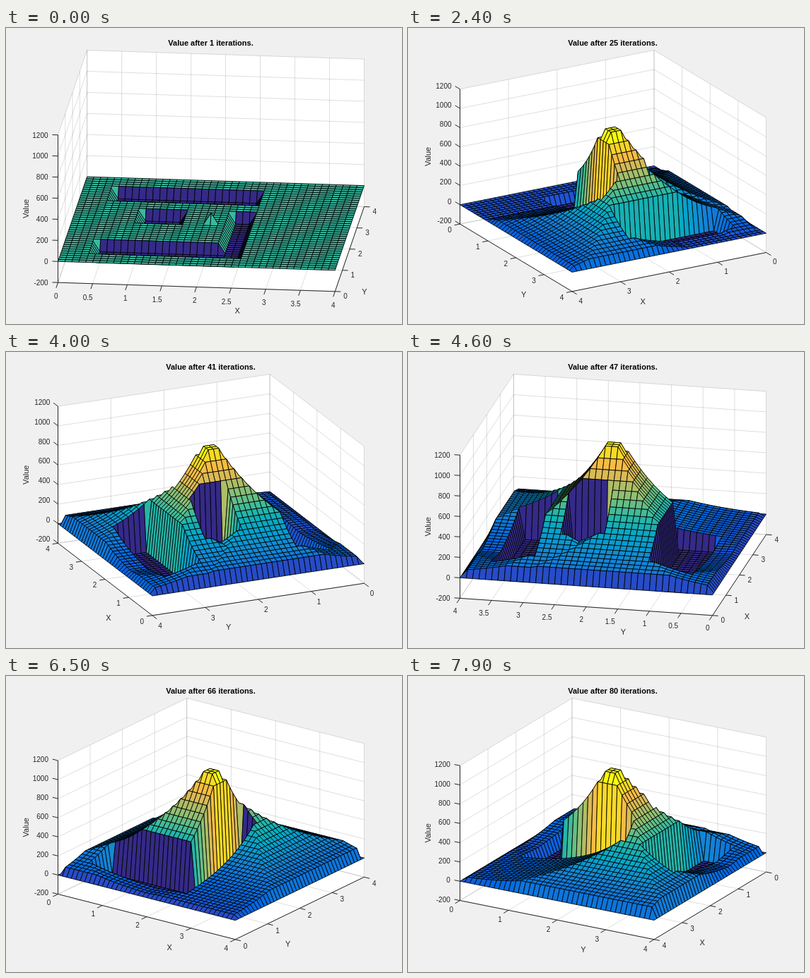
Recreate the animation shown at these times as an HTML page with a canvas. Size 560x420 px, loop 8000 ms.

```html
<!DOCTYPE html>
<html lang="en">
<head>
<meta charset="utf-8">
<title>Value iteration</title>
<style>
html, body { margin: 0; width: 100%; height: 100%; overflow: hidden; background: #f0f0f0; }
canvas { display: block; }
</style>
</head>
<body>
<canvas id="stage" width="560" height="420"></canvas>
<script>
const ctx = document.getElementById('stage').getContext('2d');
const STEPS = 80, STEP_MS = 100, DEG_PER_STEP = 6;
const N = 40, GAMMA = 0.9, GOAL = 100, WALL = -100;
const Z_MIN = -200, Z_MAX = 1200;
const BOX = { left: 73.5, top: 31.5, width: 433, height: 342.3 };
const FONT = '"Liberation Sans", Arial, Helvetica, sans-serif';
const INK = '#262626';

// Walls as [i0, i1, j0, j1], inclusive grid indices.
const walls = [[5, 25, 5, 10], [23, 25, 5, 25], [10, 15, 20, 25], [5, 25, 30, 35]];
const isWall = (i, j) => walls.some(([a, b, c, d]) => i >= a && i <= b && j >= c && j <= d);

const stops = ['352a87', '353dad', '2053d4', '0268e1', '0d75dc', '1481d6', '108ed2', '079ccf',
  '06a7c6', '0faeb9', '25b5a9', '42bb98', '65be86', '87bf77', 'a5be6b', 'c0bc60',
  'd9ba56', 'f1b94a', 'ffc337', 'fad32a', 'f5e41d', 'f9fb0e']
  .map(h => [0, 2, 4].map(k => parseInt(h.slice(k, k + 2), 16)));

const colormap = Array.from({ length: 64 }, (_, n) => {
  const k = Math.min(Math.floor(n / 3), stops.length - 2), f = n / 3 - k;
  return `rgb(${stops[k].map((c, m) => Math.round(c + (stops[k + 1][m] - c) * f))})`;
});

const makeGrid = fn => Array.from({ length: N + 1 }, (_, i) =>
  Array.from({ length: N + 1 }, (_, j) => fn(i, j)));

const reward = makeGrid((i, j) => isWall(i, j) ? WALL : i === 20 && j === 20 ? GOAL : 0);

// Best of staying or moving to one of the eight neighbours; border and walls are fixed.
function iterate(V) {
  return makeGrid((i, j) => {
    if (i % N === 0 || j % N === 0 || reward[i][j] === WALL) return V[i][j];
    let best = -Infinity;
    for (let a = i - 1; a <= i + 1; a++)
      for (let b = j - 1; b <= j + 1; b++)
        best = Math.max(best, reward[a][b] + GAMMA * V[a][b]);
    return best;
  });
}

const values = [reward];
while (values.length < STEPS) values.push(iterate(values[values.length - 1]));

// Orthographic view of the unit cube, stretched to fill the box.
function makeView(degrees) {
  const az = (degrees + 1e-4) * Math.PI / 180, el = Math.PI / 6;
  const c = Math.cos(az), s = Math.sin(az), se = Math.sin(el), ce = Math.cos(el);
  const span = Math.abs(c) + Math.abs(s);
  const kx = BOX.width / span, ky = BOX.height / (span * se + ce);
  const midX = BOX.left + BOX.width / 2, midY = BOX.top + BOX.height / 2;
  const project = (x, y, z) => [
    midX + kx * (c * (x - 0.5) + s * (y - 0.5)),
    midY - ky * (se * (c * (y - 0.5) - s * (x - 0.5)) + ce * (z - 0.5))
  ];
  const front = [s > 0 ? 1 : 0, c < 0 ? 1 : 0];
  const left = [c < 0 ? 1 : 0, s < 0 ? 1 : 0];
  const flip = p => p.map(v => 1 - v);
  return { project, front, left, back: flip(front), right: flip(left) };
}

const minus = (p, q) => [p[0] - q[0], p[1] - q[1]];
const unit = v => { const d = Math.hypot(...v); return [v[0] / d, v[1] / d]; };
const zUnit = z => (z - Z_MIN) / (Z_MAX - Z_MIN);

function range(from, to, step) {
  const out = [];
  for (let v = from; v <= to; v += step) out.push(v);
  return out;
}

function trace(points) {
  ctx.beginPath();
  points.forEach(p => ctx.lineTo(p[0], p[1]));
}

function line(p, q) {
  trace([p, q]);
  ctx.stroke();
}

function text(str, x, y, size, align = 'center', weight = '') {
  ctx.font = `${weight} ${size}px ${FONT}`;
  ctx.textAlign = align;
  ctx.fillText(str, x, y + size * 0.36);
}

function drawBox(view, ticks) {
  const { project: P, front, left, right, back } = view;
  ctx.fillStyle = '#fff';
  trace([P(...left, 0), P(...left, 1), P(...back, 1), P(...right, 1), P(...right, 0), P(...front, 0)]);
  ctx.fill();

  ctx.strokeStyle = 'rgba(38,38,38,0.15)';
  ctx.lineWidth = 1;
  const [bx, by] = back;
  for (const v of ticks[0]) {
    const x = v / 4;
    line(P(x, 0, 0), P(x, 1, 0));
    line(P(x, by, 0), P(x, by, 1));
  }
  for (const v of ticks[1]) {
    const y = v / 4;
    line(P(0, y, 0), P(1, y, 0));
    line(P(bx, y, 0), P(bx, y, 1));
  }
  for (const v of ticks[2]) {
    const z = zUnit(v);
    line(P(bx, 0, z), P(bx, 1, z));
    line(P(0, by, z), P(1, by, z));
  }
}

function drawSurface(view, V) {
  const max = Math.max(...V.flat());
  const pts = makeGrid((i, j) => view.project(i / N, j / N, zUnit(V[i][j])));
  const [fx, fy] = view.front;
  ctx.strokeStyle = '#000';
  ctx.lineWidth = 0.85;
  ctx.lineJoin = 'round';
  for (let a = 0; a < N; a++) {
    const i = fx ? a : N - 1 - a;
    for (let b = 0; b < N; b++) {
      const j = fy ? b : N - 1 - b;
      const level = Math.floor(64 * (V[i][j] - WALL) / (max - WALL));
      ctx.fillStyle = colormap[Math.min(63, level)];
      trace([pts[i][j], pts[i + 1][j], pts[i + 1][j + 1], pts[i][j + 1]]);
      ctx.closePath();
      ctx.fill();
      ctx.stroke();
    }
  }
}

// One of the two horizontal axes; side is -1 for the left one, 1 for the right one.
function drawFloorAxis(view, ticks, end, other, side) {
  const P = view.project, { front } = view;
  const axis = end[0] !== front[0] ? 0 : 1;
  const p = P(...front, 0), q = P(...end, 0);
  const dir = unit(minus(p, P(...other, 0)));
  const align = side < 0 ? 'right' : 'left';
  const shift = side * (18 * Math.abs(dir[0]) - 6);
  line(p, q);
  for (const v of ticks[axis]) {
    const at = front.slice();
    at[axis] = v / 4;
    const [x, y] = P(...at, 0);
    line([x, y], [x + dir[0] * 8, y + dir[1] * 8]);
    text(String(v), x + shift, y + dir[1] * 14 + 6, 10, align);
  }
  const a = Math.abs(q[0] - p[0]), b = Math.abs(q[1] - p[1]);
  const dx = a > 430 ? 0 : 33.5 - 0.3137 * a + 0.000206 * a * a;
  const dy = 32 + 0.1155 * b + 0.001 * b * b;
  text('XY'[axis], (p[0] + q[0]) / 2 + side * dx, (p[1] + q[1]) / 2 + dy, 11);
}

function drawAxes(view, ticks) {
  const { project: P, front, left, right } = view;
  ctx.strokeStyle = ctx.fillStyle = INK;
  ctx.lineWidth = 1;
  drawFloorAxis(view, ticks, left, right, -1);
  drawFloorAxis(view, ticks, right, left, 1);

  const low = P(...left, 0), high = P(...left, 1);
  const dir = unit(minus(low, P(...front, 0)));
  line(low, high);
  for (const v of ticks[2]) {
    const [x, y] = P(...left, zUnit(v));
    line([x, y], [x + dir[0] * 8, y + dir[1] * 8]);
    text(String(v), x + dir[0] * 14, y + dir[1] * 10 + 0.5, 10, 'right');
  }
  ctx.save();
  ctx.translate(28, (low[1] + high[1]) / 2);
  ctx.rotate(-Math.PI / 2);
  text('Value', 0, 0, 11);
  ctx.restore();
}

function draw(n) {
  const view = makeView(n * DEG_PER_STEP), P = view.project;
  const edge = (x, y) => Math.hypot(...minus(P(x, y, 0), P(0, 0, 0)));
  const floorTicks = length => range(0, 4, length > 310 ? 0.5 : 1);
  const ticks = [floorTicks(edge(1, 0)), floorTicks(edge(0, 1)), range(Z_MIN, Z_MAX, 200)];

  ctx.fillStyle = '#f0f0f0';
  ctx.fillRect(0, 0, 560, 420);
  drawBox(view, ticks);
  drawSurface(view, values[n - 1]);
  drawAxes(view, ticks);
  ctx.fillStyle = '#000';
  text(`Value after ${n} iterations.`, 289.5, 21, 11, 'center', 'bold');
}

let shown = 0;
const start = performance.now();
function tick() {
  const n = Math.floor(Math.max(0, performance.now() - start) / STEP_MS) % STEPS + 1;
  if (n !== shown) draw(shown = n);
  requestAnimationFrame(tick);
}
tick();
</script>
</body>
</html>
```
